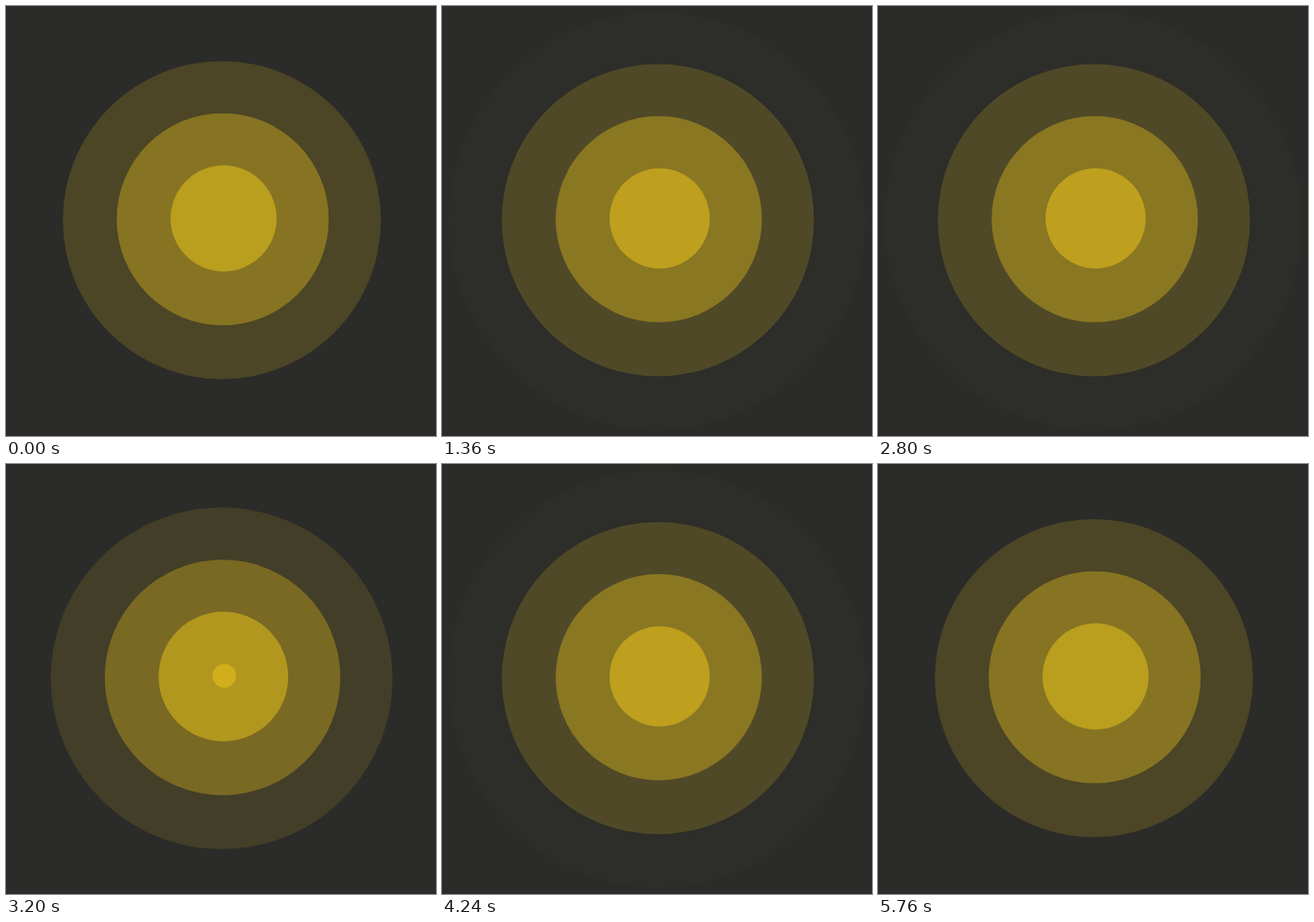
These frames come from a looping animation (500 by 500 pixels, 5.8 s). An HTML page with a canvas:

```html
<!DOCTYPE html>
<html lang="en">
<head>
<meta charset="utf-8">
<title>Pulsing rings</title>
<style>
html, body { margin: 0; width: 100%; height: 100%; overflow: hidden; background: #2b2b29; }
canvas { display: block; width: 500px; height: 500px; }
</style>
</head>
<body>
<canvas id="stage" width="500" height="500"></canvas>
<script>
const ctx = document.getElementById("stage").getContext("2d");
const LOOP = 5800, STEP = 40, LIFE = 5760, RINGS = 4, MAX_R = 246.6;

function drawRing(s) {
  ctx.globalAlpha = 0.94 * Math.pow(1 - s, 1.15);
  ctx.beginPath();
  // The centre drifts slightly down and left as the ring grows.
  ctx.arc(254 - 4 * s, 246 + 4 * s, MAX_R * s, 0, Math.PI * 2);
  ctx.fill();
}

function draw(time) {
  const phase = time / LIFE % (1 / RINGS);
  ctx.globalAlpha = 1;
  ctx.fillStyle = "#2b2b29";
  ctx.fillRect(0, 0, 500, 500);
  ctx.fillStyle = "rgb(213, 179, 29)";
  for (let i = RINGS - 1; i >= 0; i--) drawRing(phase + i / RINGS);
}

const start = performance.now();
function tick() {
  const time = (performance.now() - start) % LOOP;
  draw(Math.floor(time / STEP) * STEP);
  requestAnimationFrame(tick);
}
tick();
</script>
</body>
</html>
```
